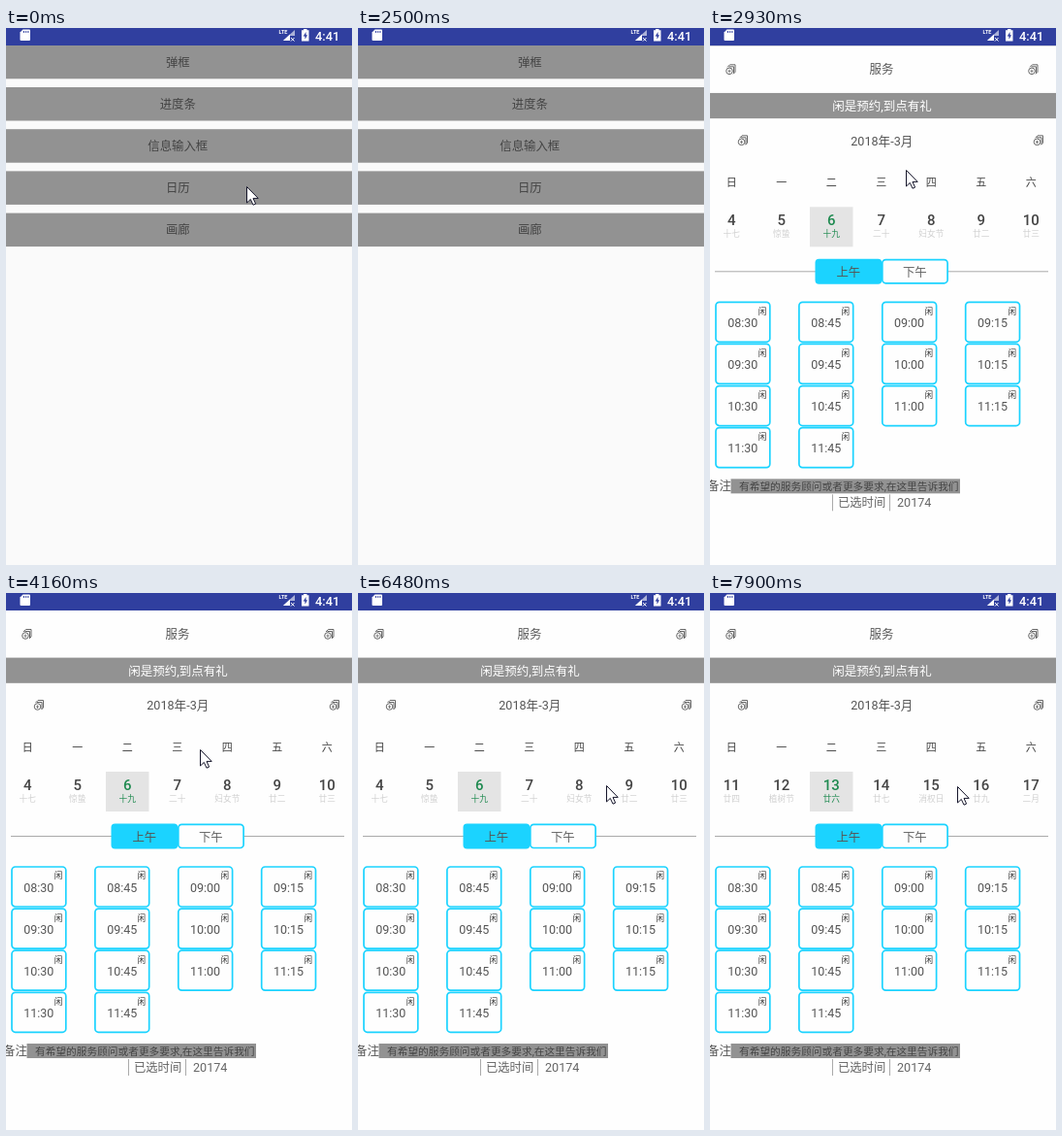
Write an HTML page that moves like this. It is 357 by 553 pixels and loops after 8 s.

```html
<!DOCTYPE html>
<html lang="zh-CN">
<head>
<meta charset="utf-8">
<style>
  html, body { margin: 0; width: 100%; height: 100%; overflow: hidden; background: #fafafa; }
  svg { display: block; width: 357px; height: 553px; }
  text { font-family: Roboto, 'Noto Sans CJK SC', 'Noto Sans CJK', sans-serif; }
</style>
</head>
<body>
<svg id="stage" viewBox="0 0 357 553"></svg>
<script>
const WIDTH = 357, DURATION = 8000, TICK = 137.5;
const CYAN = '#1bd3ff', BLUE = '#303f9f', GREY = '#929292', INK = '#555', GREEN = '#1f8a50', PAPER = '#fefefe';

const rect = (x, y, w, h, fill, extra = '') =>
  `<rect x="${x}" y="${y}" width="${w}" height="${h}" fill="${fill}" ${extra}/>`;
const outline = (x, y, w, h) =>
  rect(x, y, w, h, PAPER, `rx="3.6" stroke="${CYAN}" stroke-width="1.7"`);
// Text is placed by the middle of its line.
const text = (s, x, y, size, fill = INK, anchor = 'middle', weight = 400) =>
  `<text x="${x}" y="${y + size * .37}" font-size="${size}" fill="${fill}" text-anchor="${anchor}" font-weight="${weight}">${s}</text>`;
const line = (x1, y1, x2, y2) => `<path d="M${x1} ${y1}L${x2} ${y2}" stroke="#aaa"/>`;
const repeat = (count, make) => Array.from({ length: count }, (_, i) => make(i)).join('');
const dayX = i => 22.3 + i * 51.5;

const menu = () => ['弹框', '进度条', '信息输入框', '日历', '画廊'].map((label, i) => {
  const y = 17.8 + i * 43.2;
  return rect(0, y, WIDTH, 34.5, GREY) + text(label, 177.3, y + 17.3, 12.4, '#444');
}).join('');

const coinIcon = (x, y) => `<g transform="translate(${x} ${y})" fill="none" stroke="#666">
  <path d="M-3.5 -2.5L-1 -5H4.5V2.5L2.5 4.5M-2 -3H3V4"/><circle cx="-1.5" cy="1.5" r="3.3"/>
  <path d="M-3 1.5H0M-1.5 0V3.5" stroke-width=".8"/></g>`;

const week = (first, lunar, shift) => `<g transform="translate(${shift})">` +
  rect(103, 184, 44.5, 41, '#e4e4e4') +
  lunar.split(' ').map((name, i) =>
    text(first + i, dayX(i), 197.3, 15, i == 2 ? GREEN : '#444', 'middle', 500) +
    text(name, dayX(i), 211.8, 8.7, i == 2 ? GREEN : '#d0d0d0')).join('') + '</g>';

const slot = i => {
  const x = 6 + i % 4 * 85.9, y = 282 + Math.floor(i / 4) * 43.1;
  const minutes = 510 + i * 15, two = n => String(n).padStart(2, '0');
  return outline(x, y, 55.8, 41) +
    text(`${two(Math.floor(minutes / 60))}:${two(minutes % 60)}`, x + 27.8, y + 21.2, 12.5) +
    text('闲', x + 48, y + 9.3, 8.6, '#333');
};

const booking = () =>
  rect(0, -3, WIDTH, 21, BLUE) + rect(0, 18, WIDTH, 535, PAPER) +
  text('服务', 177, 42, 12.4) + coinIcon(21.5, 42.5) + coinIcon(333.5, 42.5) +
  rect(0, 66.6, WIDTH, 26.2, GREY) + text('闲是预约,到点有礼', 177.5, 80, 12.5, '#fff') +
  text('2018年-3月', 177.3, 115.6, 12.6) + coinIcon(34, 115.5) + coinIcon(339, 115.5) +
  repeat(7, i => text('日一二三四五六'[i], dayX(i), 158.7, 11, '#444')) +
  '<g id="weeks">' +
  week(4, '十七 惊蛰 十九 二十 妇女节 廿二 廿三', 0) +
  week(11, '廿四 植树节 廿六 廿七 消权日 廿九 二月', WIDTH) + '</g>' +
  line(5, 250.5, 349, 250.5) +
  outline(177.8, 238.3, 67.3, 24.2) + rect(108.5, 237.5, 68.8, 26, CYAN, 'rx="4"') +
  text('上午', 142.8, 251, 12.4) + text('下午', 211.3, 251, 12.4, '#666') +
  repeat(14, slot) +
  text('备注', -3, 471, 12.4, INK, 'start', 500) + rect(21.5, 464, 236.5, 15, GREY) +
  text('有希望的服务顾问或者更多要求,在这里告诉我们', 30, 471.7, 10.7, '#444', 'start') +
  line(126.5, 480, 126.5, 497) + line(185.5, 480, 185.5, 497) +
  text('已选时间', 132, 488.2, 12.3, '#666', 'start') + text('20174', 193, 488.5, 12.6, '#666', 'start');

const statusBar = () => rect(0, 0, WIDTH, 18, BLUE) +
  '<path d="M17.5 1.5H24a1 1 0 0 1 1 1V12a1 1 0 0 1-1 1H15.5a1 1 0 0 1-1-1V4.5Z" fill="#fff"/>' +
  '<path d="M18.5 3v2M20.7 3v2M22.9 3v2" stroke="#303f9f"/>' +
  text('LTE', 281.5, 4, 5.5, '#fff', 'start', 700) +
  '<path d="M286 13L298 2V8H292V13Z" fill="#fff" opacity=".6"/><path d="M286 13L293 6.5V13Z" fill="#fff"/>' +
  '<path d="M294 10L297.5 13.5M297.5 10L294 13.5" stroke="#fff"/>' +
  '<path d="M307 1h3.5v1.3H312.5V13.5H305V2.3H307Z" fill="#fff"/>' +
  '<path d="M309.5 4L306.7 8.5H308.5V11.8L311 7.3H309.5Z" fill="#303f9f"/>' +
  text('4:41', 319, 8.2, 12.8, '#fff', 'start', 500);

const stage = document.getElementById('stage');
stage.innerHTML = menu() + `<g id="page">${booking()}</g>` + statusBar() +
  '<path id="cursor" d="M.5 .5V17L4.3 13.4L7 19.2L9.6 18.1L7 12.4H12.2Z" fill="#fff" stroke="#15152a"/>';
const [page, weeks, cursor] = ['page', 'weeks', 'cursor'].map(id => document.getElementById(id));

// Where the cursor turns or rests: tick, x, y.
const turns = [
  [3, 248, 163], [5, 228, 161], [7, 183, 167], [18, 183, 167], [19, 202, 146], [22, 202, 146],
  [24, 203, 208], [26, 203, 218], [28, 193, 280], [30, 200, 161], [31, 125, 104], [32, 99, 131],
  [35, 46, 126], [38, 230, 208], [40, 197, 195], [43, 110, 214], [47, 256, 198], [49, 256, 198],
  [52, 100, 210], [55, 245, 205], [57, 255, 199]
];
function cursorAt(tick) {
  const next = turns.findIndex(turn => turn[0] >= tick);
  const b = turns[next], a = turns[Math.max(0, next - 1)];
  const k = b === a ? 0 : (tick - a[0]) / (b[0] - a[0]);
  return [1, 2].map(i => Math.round(a[i] + (b[i] - a[i]) * k));
}

// The weeks follow the pressed cursor; the second swipe glides on to the next week.
function weekShift(tick) {
  const grabbed = (start, now) => Math.max(0, cursorAt(start)[0] - cursorAt(now)[0]);
  if (tick < 40) return 0;
  if (tick < 49) return grabbed(40, tick);
  if (tick <= 52) return grabbed(49, tick);
  return WIDTH - (WIDTH - grabbed(49, 52)) * .15 ** (tick - 52);
}

function draw(now) {
  // The screen refreshes once per tick.
  const tick = Math.min(57, Math.floor(now % DURATION / TICK));
  const opened = tick - 19;
  cursor.setAttribute('transform', `translate(${cursorAt(tick)})`);
  cursor.setAttribute('opacity', tick == 18 ? 0 : 1);
  page.setAttribute('transform', `translate(0 ${opened < 0 ? 0 : 22.6 * .12 ** opened})`);
  page.setAttribute('opacity', opened < 0 ? 0 : Math.min(1, .71 + opened * .3));
  weeks.setAttribute('transform', `translate(${-weekShift(tick)})`);
}

const start = performance.now();
function loop() {
  draw(performance.now() - start);
  requestAnimationFrame(loop);
}
loop();
</script>
</body>
</html>
```
